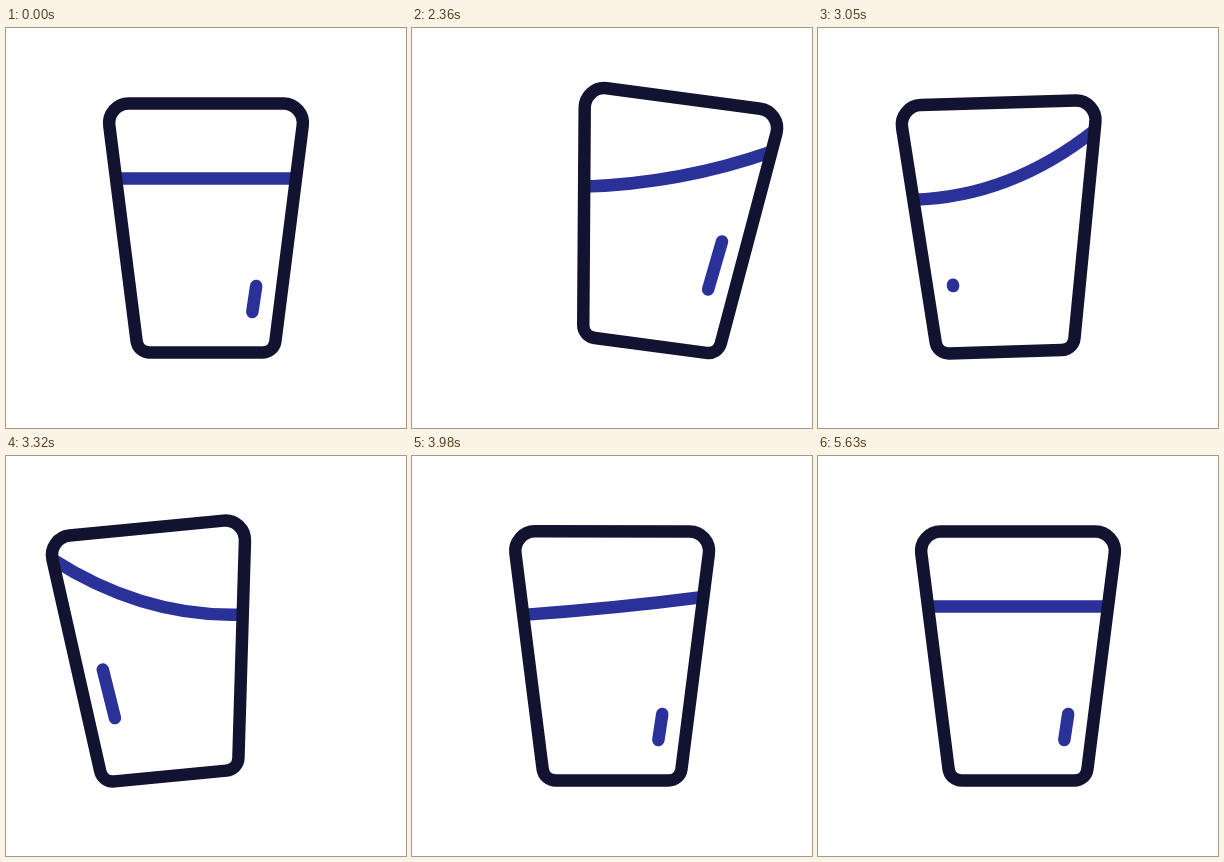
An HTML page for the animation above (5.69 s loop, 400 px wide and 400 px high).

```html
<!DOCTYPE html>
<html lang="en">
<head>
<meta charset="utf-8">
<title>Glass of water</title>
<style>
html, body { margin: 0; width: 100%; height: 100%; overflow: hidden; background: #fff; }
svg { display: block; width: 100%; height: 100%; }
path { fill: none; stroke-width: 12.5; stroke-linejoin: round; }
.dark { stroke: #121331; }
.blue { stroke: #2a3299; }
.round { stroke-linecap: round; }
</style>
</head>
<body>
<svg viewBox="0 0 400 400">
  <g id="glass">
    <path id="water" class="blue"/>
    <path id="shineR" class="blue round"/>
    <path id="shineL" class="blue round"/>
    <path class="dark" d="M122.5 75.4H277.5C289 75.4 298.2 85.8 296.7 97.6L269.4 313.2C268.5 319.8 262.9 324.5 256.2 324.5H143.8C137.1 324.5 131.5 319.8 130.6 313.2L103.3 97.6C101.8 85.8 111 75.4 122.5 75.4Z"/>
  </g>
</svg>
<script>
const LOOP = 5690, START = 2030, STEP = 30;
const LAG = 145, CALM = 4140, END = 5620;
const $ = id => document.getElementById(id);
const clamp = v => Math.min(1, Math.max(0, v));
const smooth = (a, b, t) => {
  const p = clamp((t - a) / (b - a));
  return p * p * (3 - 2 * p);
};

// The glass swings right, left, right and back.
const swings = [
  { t: 2000, x: 0, angle: 0 },
  { t: 2650, x: 77.5, angle: 10.7, ease: [.167, .21, .667, 1] },
  { t: 3235, x: -56.5, angle: -7, ease: [.52, 0, .667, 1] },
  { t: 3635, x: 20.6, angle: 5.95, ease: [.333, 0, .667, 1] },
  { t: 3995, x: 0, angle: 0, ease: [.333, 0, .667, 1] }
];

const cubic = (a, b, s) => 3 * a * s * (1 - s) ** 2 + 3 * b * s * s * (1 - s) + s ** 3;

function bezier([x1, y1, x2, y2], p) {
  let lo = 0, hi = 1;
  for (let i = 0; i < 24; i++) {
    const mid = (lo + hi) / 2;
    if (cubic(x1, x2, mid) < p) lo = mid; else hi = mid;
  }
  return cubic(y1, y2, lo);
}

function pose(t) {
  const i = swings.findIndex(s => t < s.t);
  if (i < 1) return { x: 0, angle: 0 };
  const a = swings[i - 1], b = swings[i];
  const k = bezier(b.ease, (t - a.t) / (b.t - a.t));
  return { x: a.x + (b.x - a.x) * k, angle: a.angle + (b.angle - a.angle) * k };
}

// After the glass stops, the surface rocks with a fading sine.
function ripple(t) {
  if (t < CALM || t > END) return 0;
  return 11 * (1 - (t - CALM) / (END - CALM)) * Math.sin(Math.PI * (t - CALM) / 400);
}

const wallX = y => 103.3 + (y - 97.6) * .1265;

// The surface follows the glass late, and sags while it moves.
function drawWater(t) {
  const wave = ripple(t);
  const tilt = wave - 42.5 * Math.tanh(pose(t - LAG).x / 40);
  const sag = 16 * smooth(2000, 2800, t) * (1 - smooth(3200, CALM, t)) + .3 * Math.abs(wave);
  const mid = 150.5 + .08 * sag - .065 * tilt;
  const left = mid - sag - tilt, right = mid - sag + tilt;
  $('water').setAttribute('d',
    `M${wallX(left)} ${left}Q${200 - .3 * tilt} ${mid + sag} ${400 - wallX(right)} ${right}`);
}

// The shine climbs as the glass leans and swaps sides with it.
function drawShine(id, side, x, size) {
  const climb = Math.min(1, Math.abs(x / 46) ** 3);
  const top = 258 - 46 * climb;
  const bottom = top + (26 + 23.5 * climb) * size;
  const at = y => `${200 + side * (50.2 - (y - 258) * .15)} ${y}`;
  $(id).setAttribute('d', size ? `M${at(top)}L${at(bottom)}` : '');
}

function draw(t) {
  const { x, angle } = pose(t);
  const lift = .25 * Math.abs(angle) + .0097 * Math.abs(x * angle);
  $('glass').setAttribute('transform', `translate(${x} ${-lift}) rotate(${angle} 200 199.75)`);
  drawWater(t);
  drawShine('shineR', 1, x, clamp(1 + x / 15));
  drawShine('shineL', -1, x, clamp(-(x + 15) / 25));
}

const begin = performance.now();
function tick() {
  const t = (performance.now() - begin) % LOOP;
  draw(t < START ? 0 : START + Math.floor((t - START) / STEP) * STEP);
  requestAnimationFrame(tick);
}
tick();
</script>
</body>
</html>
```
